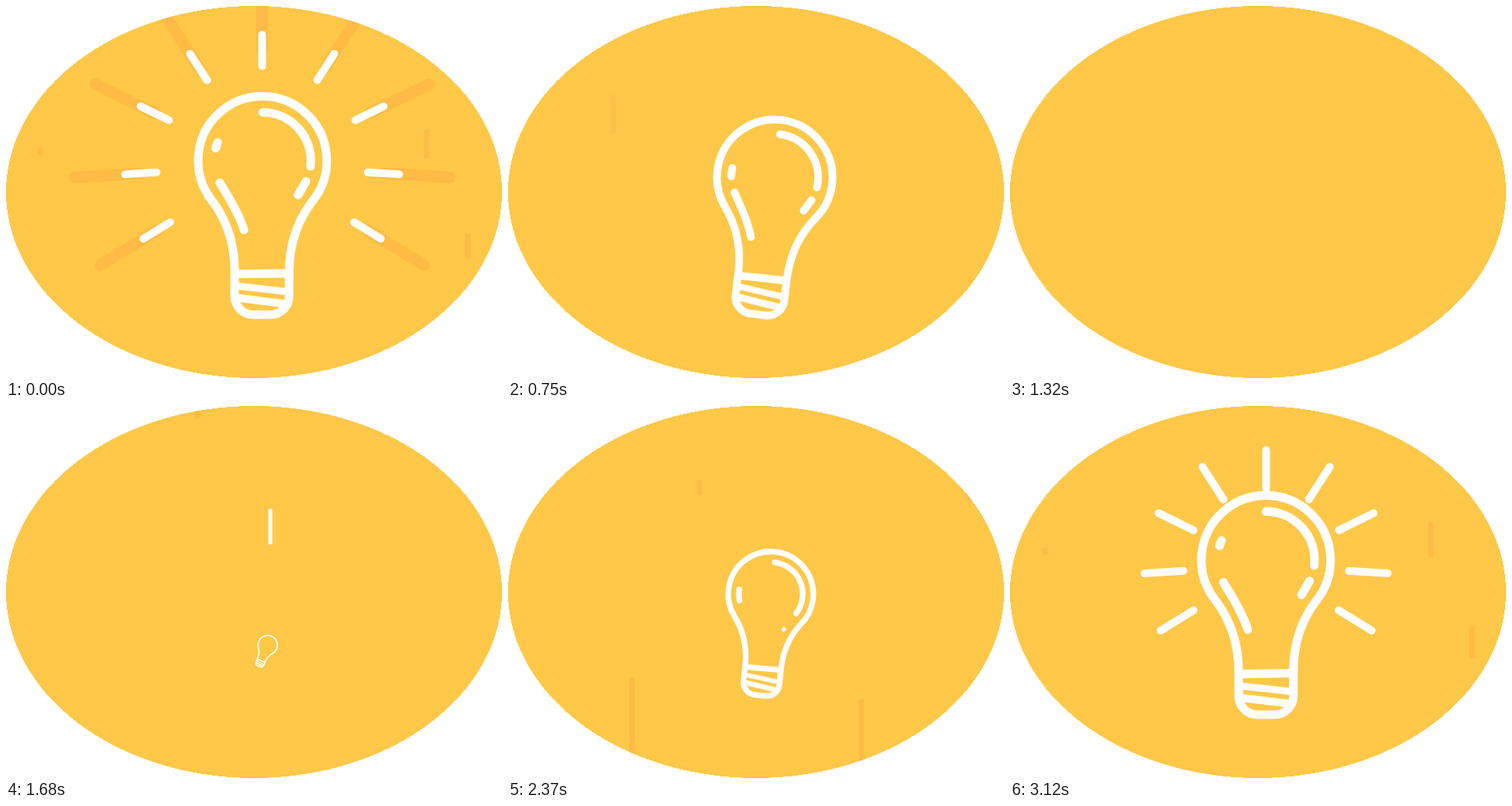
Write an HTML page that moves like this. It is 640 px wide and 480 px high and loops after 3.15 s.

```html
<!DOCTYPE html>
<html lang="en">
<head>
<meta charset="utf-8">
<title>Light bulb</title>
<style>
  html, body { margin: 0; width: 100%; height: 100%; overflow: hidden; background: #fff; }
  svg { display: block; width: 100vw; height: 100vh; }
  path { fill: none; stroke: #fff; stroke-linecap: round; stroke-linejoin: round; }
  #streaks path, #glow path { stroke: #ffbb46; stroke-width: 7; }
  #glow path { stroke-width: 15; }
  #rays path { stroke-width: 10; }
  #bulb path { stroke-width: 11; }
</style>
</head>
<body>
<svg viewBox="0 0 640 480">
  <clipPath id="oval"><ellipse cx="320" cy="240" rx="320" ry="240"/></clipPath>
  <ellipse cx="320" cy="240" rx="320" ry="240" fill="#ffc848" shape-rendering="crispEdges"/>
  <g clip-path="url(#oval)">
    <g id="streaks"></g>
    <g id="glow"></g>
    <g id="rays"></g>
    <path id="drop" stroke-width="5"/>
    <!-- origin: centre of the round head -->
    <g id="bulb">
      <path d="M-65 50.8C-48 73 -35 103 -35 142V173.5a24 24 0 0 0 24 24H11a24 24 0 0 0 24 -24V142C35 103 48 73 65 50.8A82.5 82.5 0 1 0 -65 50.8Z"/>
      <path d="M-33 145.5L33 144.5"/>
      <path d="M-32 161L33 168" style="stroke-width:9"/>
      <path d="M-32 176L33 184" style="stroke-width:10"/>
    </g>
  </g>
</svg>
<script>
// The loop is counted from 1500 (empty stage) to 4650.
const LOOP = 3150, STEP = 30, START = 1500, BURST = 3120, TOSS = 3900;
const $ = id => document.getElementById(id);

// Progress from a to b between times t0 and t1.
const part = (t, t0, t1) => Math.min(1, Math.max(0, (t - t0) / (t1 - t0)));
const linear = (t, t0, t1, a, b) => a + (b - a) * part(t, t0, t1);
const ease = (t, t0, t1, a, b) => b - (b - a) * (1 - part(t, t0, t1)) ** 2;

function addPath(parent, d = '') {
  const p = document.createElementNS('http://www.w3.org/2000/svg', 'path');
  p.setAttribute('d', d);
  return parent.appendChild(p);
}

function show(el, visible) {
  el.style.display = visible ? '' : 'none';
  return visible;
}

function line(el, x1, y1, x2, y2) {
  el.setAttribute('d', `M${x1} ${y1}L${x2} ${y2 + .01}`);
}

// time, scale, tilt
const poses = [
  [1500, 0, 28], [1980, .403, 14.5], [2370, .665, 6], [2790, .81, -3],
  [BURST, 1.01, 0], [TOSS, .903, 7], [4470, .76, 73]
];

// Reflections run anticlockwise along one track on each side of the glass.
const RIGHT = 'M0 -62A62 62 0 0 1 57.1 24.2Q47 43 30 69';
const LEFT = 'M-39.9 -47.5A62 62 0 0 0 -58.3 21.2C-52 35 -32 60 -23 90';
// Each end: start time, end time, from, to.
const shines = [
  [RIGHT, [1740, 2440, 138, 0], [2300, 3000, 138, 104]],
  [RIGHT, [2360, 3260, 171, 124], [2700, 3300, 171, 143]],
  [LEFT, [2080, 2850, 0, 84], [2080, 3120, 0, 152]],
  [LEFT, [2790, 3700, 0, 48], [2790, 3700, 0, 60]]
].map(([d, from, to]) => ({ el: addPath($('bulb'), d), from, to }));

function drawBulb(t) {
  if (!show($('bulb'), t < 4470)) return;
  const i = poses.findIndex(p => p[0] > t);
  const [t0, s0, a0] = poses[i - 1], [t1, s1, a1] = poses[i];
  const scale = linear(t, t0, t1, s0, s1), tilt = linear(t, t0, t1, a0, a1);
  const air = Math.max(0, t - TOSS);
  const y = linear(t, BURST, TOSS, 326, 334) - .93 * air + .0031 * air * air;
  $('bulb').setAttribute('transform',
    `translate(330.3 ${y}) rotate(${tilt}) scale(${scale}) translate(0 -126)`);
  for (const { el, from, to } of shines) {
    if (!show(el, t >= from[0])) continue;
    const a = ease(t, ...from), len = Math.max(.01, ease(t, ...to) - a);
    el.style.strokeDasharray = `${len} 999`;
    el.style.strokeDashoffset = -a;
    el.style.strokeWidth = 11 * Math.min(1, .65 + len / 20);
  }
}

const rays = [];
for (let i = -4; i <= 4; i++) {
  const n = Math.abs(i);
  const angle = i * (33.6 - .8 * n) * Math.PI / 180;
  rays.push({ dx: Math.sin(angle), dy: -Math.cos(angle), r: 149 + 2.7 * n,
    el: addPath($('rays')), glow: addPath($('glow')) });
}

function drawRay(el, { dx, dy, r }, a, b) {
  line(el, 330.5 + dx * (r + a), 206 + dy * (r + a), 330.5 + dx * (r + b), 206 + dy * (r + b));
}

function drawRays(t) {
  const tip = ease(t, 2970, BURST, -50, 0) + linear(t, BURST, 3240, 0, 80);
  const tail = linear(t, BURST, 3252, -50, 80);
  const lit = show($('rays'), t >= 2970 && t < 3252);
  const glowing = show($('glow'), t >= 3150 && t < 3360);
  for (const ray of rays) {
    if (lit) drawRay(ray.el, ray, tail, tip);
    if (glowing) drawRay(ray.glow, ray, ease(t, 3150, 3360, 0, 85), 85);
  }
}

// x, top, bottom, start time, delay of the upper end, opacity
const streaks = [
  [247, -55, 113, 1450, 500], [456, 350, 910, 1950, 400], [160, 311, 811, 1977, 360],
  [45, 90, 191, 2270, 0], [543, -60, 197, 2270, 500], [596, 60, 326, 2250, 500],
  [136, 118, 170, 3300, 600, .6]
].map(([x, top, bottom, t0, lag, opacity = 1]) => {
  const el = addPath($('streaks'));
  el.style.opacity = opacity;
  return { el, x, top, bottom, t0, lag };
});

function drawStreaks(t) {
  for (const { el, x, top, bottom, t0, lag } of streaks) {
    const end = t0 + 1100;
    if (!show(el, t >= t0 && t < end)) continue;
    line(el, x, ease(t, t0 + lag, end, top, bottom), x, ease(t, t0, t0 + 1000, top, bottom));
  }
  if (show($('drop'), t <= 1980))
    line($('drop'), 341, ease(t, 1600, 1980, 86, 215.5), 341, ease(t, 1500, 1900, 86, 215.5));
}

const begin = performance.now();
function tick() {
  let t = Math.floor((performance.now() - begin) % LOOP / STEP) * STEP;
  if (t < START) t += LOOP;
  drawStreaks(t);
  drawRays(t);
  drawBulb(t);
  requestAnimationFrame(tick);
}
tick();
</script>
</body>
</html>
```
